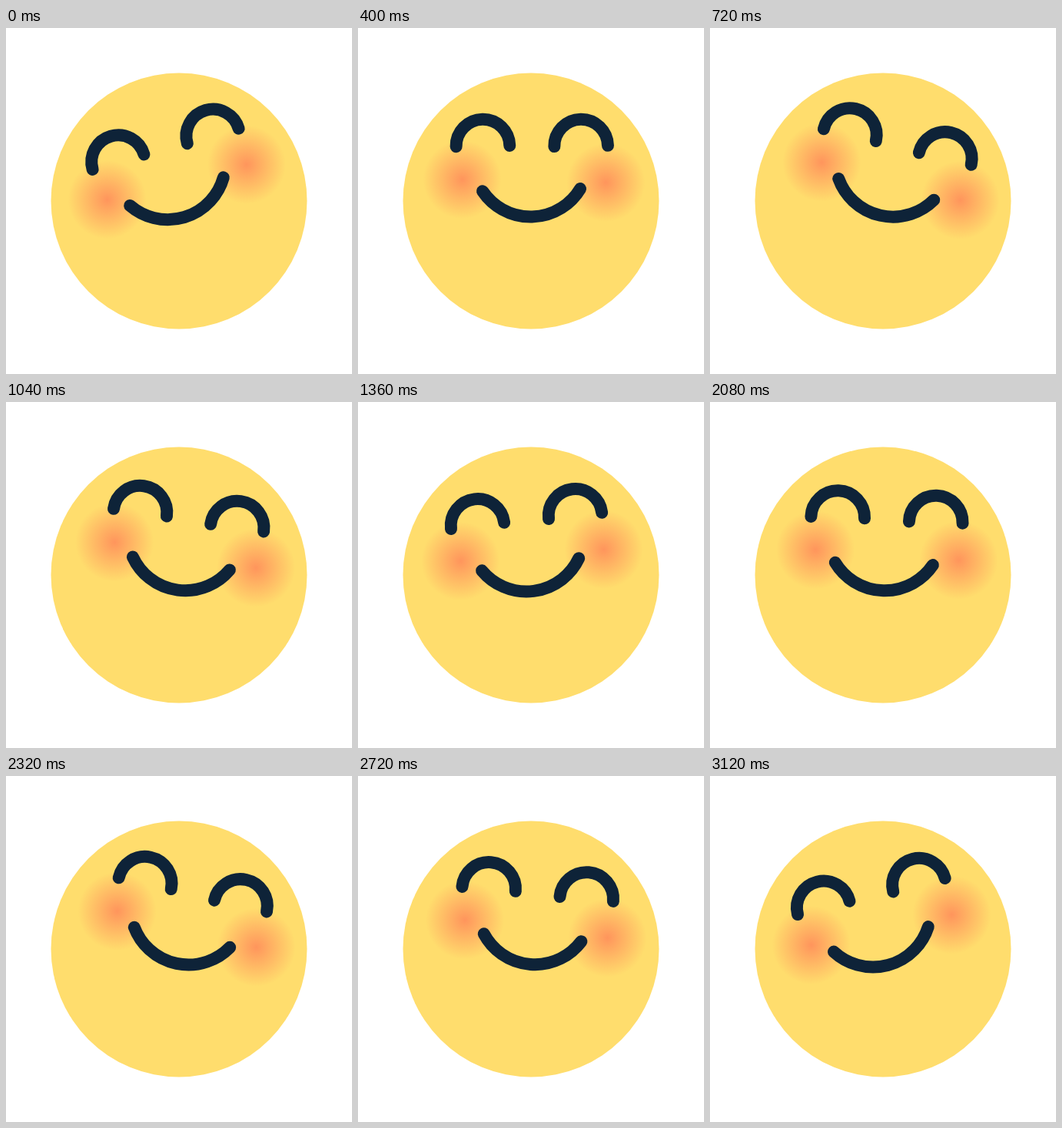
Recreate the animation shown at these times as an HTML page. Size 450x450 px, loop 3200 ms.

```html
<!DOCTYPE html>
<html lang="en">
<head>
<meta charset="utf-8">
<title>Swaying smile</title>
<style>
  html, body { margin: 0; width: 100%; height: 100%; overflow: hidden; background: #fff; }
  svg { display: block; width: 100%; height: 100%; }
</style>
</head>
<body>
<svg viewBox="0 0 450 450">
  <defs>
    <radialGradient id="blush">
      <stop offset="0" stop-color="#ff955c"/>
      <stop offset="1" stop-color="#ff955c" stop-opacity="0"/>
    </radialGradient>
  </defs>
  <circle cx="225" cy="225" r="166.5" fill="#ffdd6d"/>
  <g id="face">
    <circle cx="135.5" cy="197.5" r="51" fill="url(#blush)"/>
    <circle cx="322.3" cy="200.5" r="51" fill="url(#blush)"/>
    <g fill="none" stroke="#0e2338" stroke-width="16" stroke-linecap="round">
      <path d="M127.3 154.7a34.8 34.8 0 0 1 69.6 -1.6"/>
      <path d="M255 154a34.8 34.8 0 0 1 69.6 -1.6"/>
      <path d="M162 212.6A75.3 75.3 0 0 0 289 208.8"/>
    </g>
  </g>
</svg>
<script>
  const LOOP = 3200, STEP = 80;
  // Turning points of the sway: [time in ms, angle in degrees]
  const turns = [[0, -15], [790, 15], [1652, -13], [2426, 15], [3245, -15]];
  const face = document.getElementById('face');

  function angleAt(t) {
    const i = turns.findIndex(([end]) => t < end);
    const [t0, a0] = turns[i - 1], [t1, a1] = turns[i];
    const s = (t - t0) / (t1 - t0);
    return a0 + (a1 - a0) * s * s * (3 - 2 * s);
  }

  function draw() {
    const t = Math.floor(performance.now() % LOOP / STEP) * STEP;
    face.setAttribute('transform', `rotate(${angleAt(t)} 231 225)`);
    requestAnimationFrame(draw);
  }
  draw();
</script>
</body>
</html>
```
